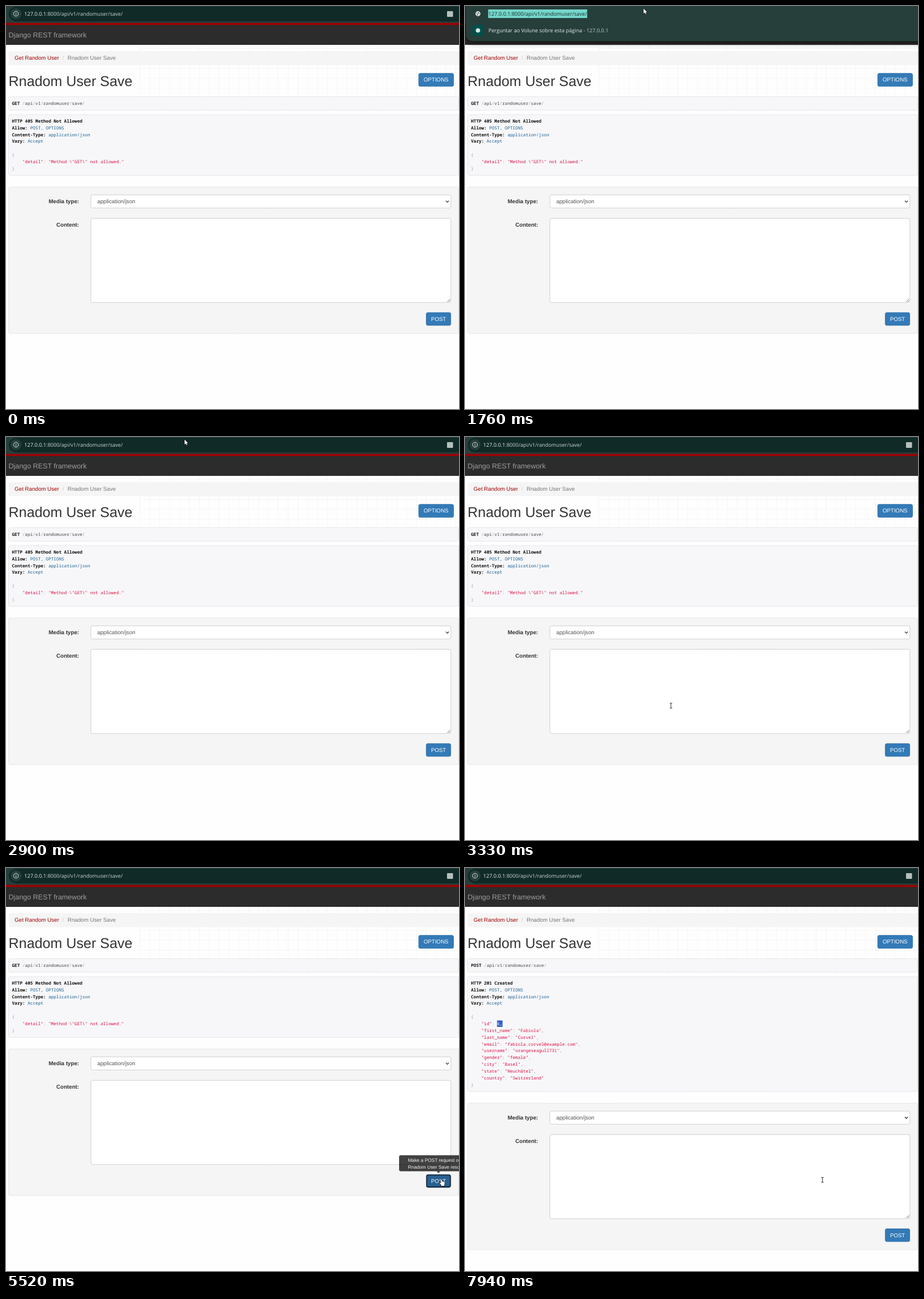
Write an HTML page with a canvas that moves like this. It is 794 px wide and 705 px high and loops after 8000 ms.

```html
<!DOCTYPE html>
<html lang="en">
<head>
<meta charset="utf-8">
<title>Rnadom User Save</title>
<style>
html, body { margin: 0; width: 100%; height: 100%; overflow: hidden; background: #fff; }
canvas { display: block; width: 794px; height: 705px; }
</style>
</head>
<body>
<canvas id="stage"></canvas>
<script>
const W = 794, H = 705, LOOP = 8000;
const canvas = document.getElementById('stage');
const dpr = window.devicePixelRatio || 1;
canvas.width = W * dpr;
canvas.height = H * dpr;
const c = canvas.getContext('2d');

const SANS = '"Liberation Sans", Arial, sans-serif';
const UI = '"Open Sans", "Noto Sans", sans-serif';
const MONO = '"Noto Sans Mono", "DejaVu Sans Mono", monospace';
const BODY = '9.68px ' + SANS;
const BOLD = 'bold ' + BODY;
const CODE = '7.62px ' + MONO;
const LINE = 11.85;
const INK = { plain: '#48484c', mark: '#93a1a1', string: '#dd1144', value: '#195f91', head: '#111' };

// Moments at which the page changes
const OPEN = 1370, CLOSE = 2360, HOVER = 4430, PRESS = 4980, TIP = 5450, REPLY = 5590;

const BEFORE = ['{', '    "detail": "Method \\"GET\\" not allowed."', '}'];
const AFTER = [
  '{',
  '    "id": 6,',
  '    "first_name": "Fabiola",',
  '    "last_name": "Corvel",',
  '    "email": "fabiola.corvel@example.com",',
  '    "username": "orangeseagull731",',
  '    "gender": "female",',
  '    "city": "Basel",',
  '    "state": "Neuchâtel",',
  '    "country": "Switzerland"',
  '}'
];

// Pointer: time, x, y
const PATH = [
  [130, 362, 709], [500, 345, 330], [880, 316, 13.5], [1440, 316, 13.5],
  [1700, 313, 4.5], [2900, 313, 4.5], [3120, 330, 225], [3330, 361, 470],
  [3470, 420, 484], [3670, 540, 439], [3880, 540, 439], [4130, 748, 534.5],
  [4360, 748, 534.5], [4520, 757, 550], [4690, 763, 544.5], [5860, 763, 544.5],
  [6250, 380, 400], [6600, 36, 267], [6740, 33, 272], [6880, 33, 272],
  [7080, 67, 272], [7180, 67, 272], [7370, 58, 272], [7520, 58, 272],
  [7700, 300, 410], [7860, 626.5, 545.5], [8000, 626.5, 545.5]
];

function text(str, x, y, font, color, align = 'left') {
  c.font = font;
  c.fillStyle = color;
  c.textAlign = align;
  c.fillText(str, x, y);
  return c.measureText(str).width;
}

function box(x, y, w, h, r, fill, border) {
  c.beginPath();
  c.roundRect(x, y, w, h, r);
  if (fill) { c.fillStyle = fill; c.fill(); }
  if (border) { c.strokeStyle = border; c.lineWidth = 0.8; c.stroke(); }
}

function rect(x, y, w, h, color) {
  c.fillStyle = color;
  c.fillRect(x, y, w, h);
}

function disc(x, y, r, color) {
  c.fillStyle = color;
  c.beginPath();
  c.arc(x, y, r, 0, 7);
  c.fill();
}

function line(points, color, width) {
  c.beginPath();
  points.forEach(([x, y], i) => i ? c.lineTo(x, y) : c.moveTo(x, y));
  c.strokeStyle = color;
  c.lineWidth = width;
  c.stroke();
}

function backdrop() {
  rect(0, 0, W, H, '#fefefe');
  const fade = c.createLinearGradient(0, 68, 0, 330);
  fade.addColorStop(0, 'rgba(0,0,0,0.045)');
  fade.addColorStop(0.4, 'rgba(0,0,0,0.03)');
  fade.addColorStop(1, 'rgba(0,0,0,0)');
  for (let x = 234.5; x < W; x += 17.3) rect(x, 68, 0.8, 262, fade);
  for (let y = 74; y < 160; y += 17.3) rect(234, y, W - 234, 0.8, fade);
}

function navbar() {
  rect(0, 29, W, 39, '#2c2c2c');
  rect(0, 29.4, W, 3.8, '#a30000');
  text('Django REST framework', 4.6, 54.8, '12.4px ' + SANS, '#9d9d9d');
}

function addressBar() {
  rect(0, 0, W, 29.4, '#263f3c');
  box(5, 1, 820, 26, 13, '#102a28');
  disc(17.5, 13.5, 9.6, '#263f3c');
  c.strokeStyle = '#dfe8e6';
  c.lineWidth = 1;
  c.beginPath();
  c.arc(17.5, 13.5, 4.2, 0, 7);
  c.stroke();
  rect(17, 13, 1, 2.7, '#dfe8e6');
  rect(17, 11.2, 1, 1, '#dfe8e6');
  const host = text('127.0.0.1', 32, 17, '9.1px ' + UI, '#e6eeec');
  text(':8000/api/v1/randomuser/save/', 32 + host, 17, '9.1px ' + UI, '#c8d4d1');
  box(773, 9, 10.5, 10, 1, '#b4c0bd');
}

function suggestions() {
  rect(0, 0, W, 29.4, '#263f3c');
  c.save();
  c.shadowColor = 'rgba(0,0,0,0.6)';
  c.shadowBlur = 9 * dpr;
  c.shadowOffsetY = 3 * dpr;
  box(2, -20, 820, 81.5, 11, '#273f3b');
  c.restore();
  disc(22.7, 13.5, 4.4, '#dfe8e6');
  line([[19.6, 12], [22, 14.2], [22, 17]], '#273f3b', 1);
  line([[23.3, 10], [23.3, 12.2], [25.8, 13.6]], '#273f3b', 1);

  const url = '127.0.0.1:8000/api/v1/randomuser/save/';
  c.font = '9.1px ' + UI;
  rect(40.6, 6, c.measureText(url).width + 1, 15, '#74d6ca');
  text(url, 41, 17, '9.1px ' + UI, '#17302d');

  box(13, 33, 19.5, 19.5, 3, '#00504b');
  disc(22.7, 42.7, 3.8, '#d5e8e5');
  const w = text('Perguntar ao Volune sobre esta página', 41, 45.6, '9.1px ' + UI, '#e2eae8');
  text(' - 127.0.0.1', 41 + w, 45.6, '9.1px ' + UI, '#bccbc7');
}

function header() {
  box(4.5, 79, 789.5, 24.6, 2.8, '#f5f5f5');
  text('Get Random User', 15, 94.3, BODY, '#a30000');
  text('/', 99, 94.3, BODY, '#ccc');
  text('Rnadom User Save', 108, 94.3, BODY, '#777');
  text('Rnadom User Save', 4.6, 139.7, '24.87px ' + SANS, '#333');
  box(723.3, 117.8, 61.2, 22.8, 2.8, '#337ab7', '#2e6da4');
  text('OPTIONS', 753.8, 132.2, BODY, '#fff', 'center');
}

function tokens(str, x, y, pattern, ink) {
  for (const part of str.match(pattern)) x += text(part, x, y, CODE, ink(part));
}

function jsonInk(part) {
  if (part[0] === '"') return INK.string;
  return /\d/.test(part) ? INK.value : INK.mark;
}

function selection(t, y) {
  const count = t < 7260 ? 0 : t < 7340 ? 1 : 2;
  if (!count) return;
  c.font = CODE;
  const step = c.measureText('0').width;
  const end = 10.5 + 12 * step;
  const start = end - count * step;
  rect(start, y - 8.3, count * step + 0.4, 11.3, '#2f5fcb');
  text('6,'.slice(-count), start, y, CODE, '#fff');
}

function response(t, done, lines) {
  const method = done ? 'POST' : 'GET';
  box(4.5, 158.6, 789, 23.7, 2.8, '#f7f7f9', '#e1e1e8');
  const w = text(method + ' ', 10.5, 173, 'bold ' + CODE, INK.head);
  tokens('/api/v1/randomuser/save/', 10.5 + w, 173, /\/|\w+/g,
    p => p === '/' ? INK.mark : INK.plain);

  box(4.5, 190, 789, 70.8 + LINE * lines.length, 2.8, '#f7f7f9', '#e1e1e8');
  const y = 203.9;
  const status = done ? 'HTTP 201 Created' : 'HTTP 405 Method Not Allowed';
  text(status, 10.5, y, 'bold ' + CODE, INK.head);
  const heads = [['Allow: ', 'POST, OPTIONS'], ['Content-Type: ', 'application/json'], ['Vary: ', 'Accept']];
  heads.forEach(([name, value], i) => {
    const row = y + LINE * (i + 1);
    const dx = text(name, 10.5, row, 'bold ' + CODE, INK.head);
    text(value, 10.5 + dx, row, CODE, INK.value);
  });
  lines.forEach((str, i) => tokens(str, 10.5, y + LINE * (i + 5),
    /"(?:\\.|[^"\\])*"|\s+|\d+|[{}:,]/g, jsonInk));
  if (done) selection(t, y + LINE * 6);
}

function postButton(t, done) {
  const hover = !done && t >= HOVER;
  const focus = !done && t >= PRESS;
  box(736.6, 536.3, 43, 22.5, 2.8, hover ? '#286090' : '#337ab7', hover ? '#204d74' : '#2e6da4');
  if (focus) {
    box(736.4, 536.1, 43.4, 22.9, 3, null, '#a9c4dd');
    c.beginPath();
    c.roundRect(737.4, 537.1, 41.4, 20.9, 2.4);
    c.strokeStyle = '#10151c';
    c.lineWidth = 1.3;
    c.stroke();
  }
  text('POST', 758.1, 551, BODY, '#fff', 'center');
}

function form(t, done) {
  box(4.5, 316.6, 789, 256.4, 2.8, '#f5f5f5', '#e3e3e3');
  text('Media type:', 128, 344.8, BOLD, '#333', 'right');
  text('Content:', 128, 385.7, BOLD, '#333', 'right');
  box(148.8, 330.4, 631, 23, 2.8, '#fff', '#c6c6c6');
  text('application/json', 160, 344.8, BODY, '#555');
  line([[771, 340.6], [773.6, 343.4], [776.2, 340.6]], '#333', 1.3);
  box(148.8, 371.4, 631, 147.3, 2.8, '#fff', '#c6c6c6');
  line([[773.5, 517.5], [778.5, 512.5]], '#555', 0.8);
  line([[776.3, 517.5], [778.5, 515.3]], '#555', 0.8);
  postButton(t, done);
}

function tooltip(t) {
  if (t < TIP || t >= REPLY) return;
  c.globalAlpha = t < TIP + 70 ? 0.36 : 0.74;
  box(689, 502.6, 138, 27.8, 2.8, '#000');
  c.beginPath();
  c.moveTo(754.6, 530.4);
  c.lineTo(761.4, 530.4);
  c.lineTo(758, 533.8);
  c.fill();
  c.globalAlpha = Math.min(1, c.globalAlpha + 0.2);
  text('Make a POST request on the', 758, 514, '8.29px ' + SANS, '#fff', 'center');
  text('Rnadom User Save resource', 758, 525.6, '8.29px ' + SANS, '#fff', 'center');
  c.globalAlpha = 1;
}

// Slope at a key; zero where the pointer rests
function slope(i, k) {
  const a = PATH[i - 1], b = PATH[i], d = PATH[i + 1];
  if (!a || !d) return 0;
  const still = (p, q) => p[1] === q[1] && p[2] === q[2];
  return still(a, b) || still(b, d) ? 0 : (d[k] - a[k]) / (d[0] - a[0]);
}

function pointerAt(time) {
  const t = 3330 + Math.floor((time - 3330) / 70) * 70;
  if (t < PATH[0][0]) return null;
  const i = PATH.findIndex(p => p[0] > t) - 1;
  const span = PATH[i + 1][0] - PATH[i][0];
  const u = (t - PATH[i][0]) / span;
  return [1, 2].map(k => {
    const p = PATH[i][k], q = PATH[i + 1][k];
    const m = slope(i, k) * span, n = slope(i + 1, k) * span;
    return p + u * (m + u * (3 * (q - p) - 2 * m - n + u * (2 * (p - q) + m + n)));
  });
}

function shape(path, x, y, size) {
  c.save();
  c.translate(x, y);
  c.scale(size, size);
  const p = new Path2D(path);
  c.lineJoin = 'round';
  c.lineWidth = 1.5;
  c.strokeStyle = '#111';
  c.stroke(p);
  c.fillStyle = '#fff';
  c.fill(p);
  c.restore();
}

function beam(x, y) {
  const stem = [[x, y - 4], [x, y + 4]];
  const cap = dy => [[x - 2.2, y + dy], [x + 2.2, y + dy]];
  [stem, cap(-4.2), cap(4.2)].forEach(p => line(p, '#fff', 1.9));
  [stem, cap(-4.2), cap(4.2)].forEach(p => line(p, '#333', 1));
}

function pointer(t, shift, done) {
  const pos = pointerAt(t);
  if (!pos) return;
  const [x, y] = pos;
  const inside = (l, top, r, b) => x > l && x < r && y > top && y < b;
  const open = t >= OPEN && t < CLOSE;
  const overText = (!open && inside(30, 8, 760, 24)) ||
    inside(148, 371 + shift, 770, 519 + shift) ||
    inside(10, 196, 210, 290 + shift);
  if (!done && inside(736, 536, 780, 559)) {
    shape('M-1 1Q0-.6 1.2 1V5.4L3 5Q4 5 4.3 6L5.8 6Q6.6 6.2 6.8 7.2Q8 7 8 8.4V11Q8 12.5 7 14V16H0V14.4L-3.8 9.6Q-4-.2-4 8.6Q-3 7.4-1 9.6Z', x, y, 0.72);
  } else if (overText) {
    beam(x, y);
  } else {
    shape('M0 0V12.6L3 10L5 14.4L7 13.5L5.1 9.3H9Z', x, y, 0.68);
  }
}

function draw(t) {
  const done = t >= REPLY;
  const lines = done ? AFTER : BEFORE;
  const shift = LINE * (lines.length - BEFORE.length);
  c.setTransform(dpr, 0, 0, dpr, 0, 0);
  c.textRendering = 'geometricPrecision';
  c.textBaseline = 'alphabetic';
  backdrop();
  navbar();
  header();
  response(t, done, lines);
  c.save();
  c.translate(0, shift);
  form(t, done);
  c.restore();
  tooltip(t);
  if (t >= OPEN && t < CLOSE) suggestions();
  else addressBar();
  pointer(t, shift, done);
}

const start = performance.now();
function tick() {
  draw((performance.now() - start) % LOOP);
  requestAnimationFrame(tick);
}
tick();
</script>
</body>
</html>
```
